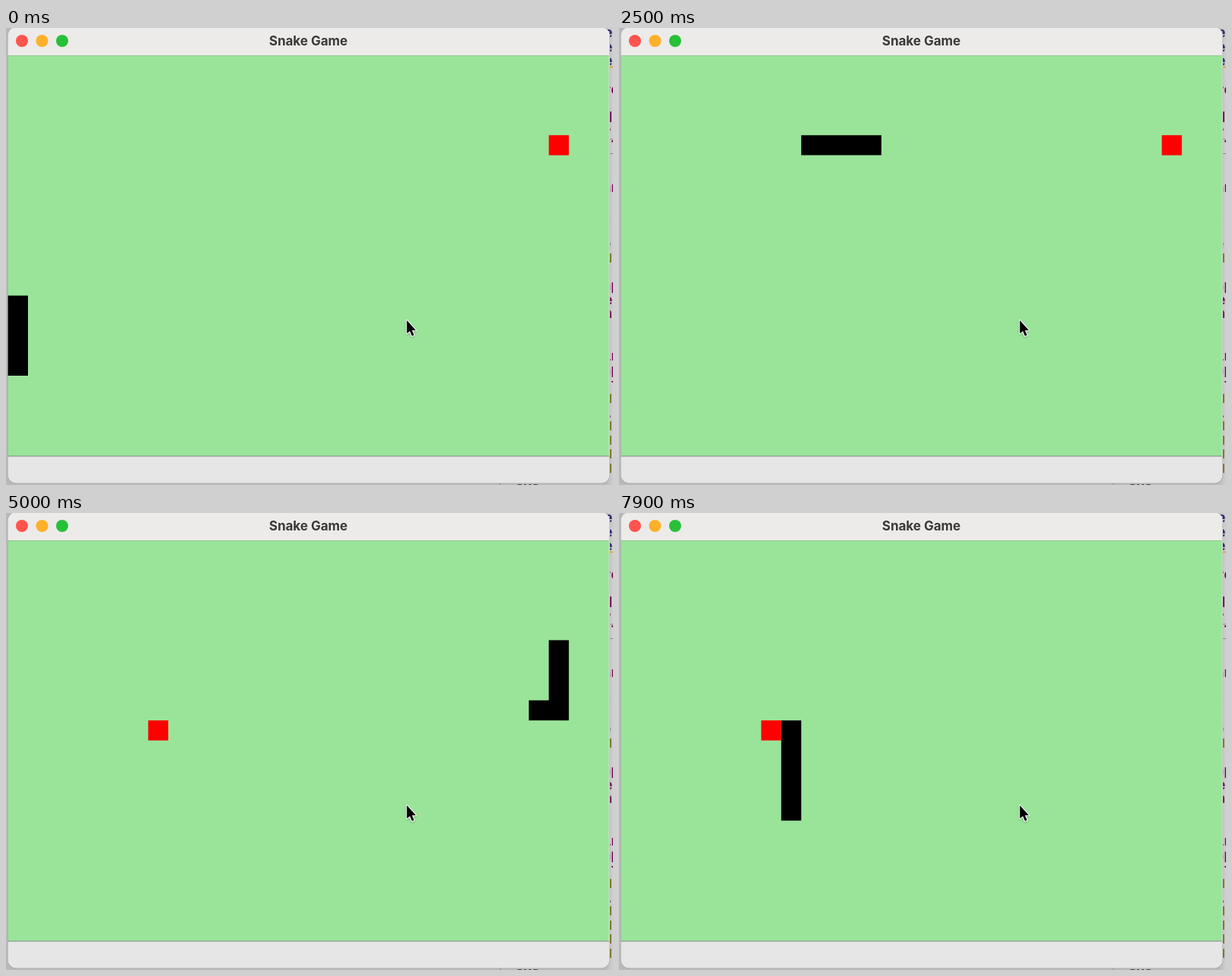
Animation of 800 by 602 pixels, one loop 8 s. Source, as an HTML page:

```html
<!DOCTYPE html>
<html lang="en">
<head>
<meta charset="utf-8">
<title>Snake Game</title>
<style>
  html, body { margin: 0; width: 100%; height: 100%; overflow: hidden; background: #c4c3c4; }
  svg { display: block; width: 800px; height: 602px; }
  .title { font: 700 17px Inter, sans-serif; fill: #3b3838; text-anchor: middle; }
  .code { font: 700 17px "DejaVu Sans Mono", monospace; }
</style>
</head>
<body>
<svg viewBox="0 0 800 602">
  <defs>
    <linearGradient id="edge">
      <stop offset="0" stop-color="#bab8ba"/>
      <stop offset="1" stop-color="#d0cdd0"/>
    </linearGradient>
    <clipPath id="frame"><rect x="2.5" y="-1" width="793" height="600.5" rx="11"/></clipPath>
    <filter id="soft" x="-50%" y="-50%" width="200%" height="200%">
      <feDropShadow dx="0" dy="1" stdDeviation="1" flood-opacity=".3"/>
    </filter>
  </defs>

  <!-- editor behind the window -->
  <rect width="800" height="602" fill="#b9b9b9"/>
  <rect x="790" width="10" height="602" fill="url(#edge)"/>
  <path d="M790 51.5h10" stroke="#e5a53a" stroke-width="2"/>
  <path d="M790 146.5h10M790 165.5h10M651.5 598v4" stroke="#8b898b"/>
  <g id="code" class="code"></g>
  <path id="bars" stroke="#77701a" stroke-width="2.5"/>
  <text class="code" x="672" y="611" fill="#333">ays</text>

  <!-- window -->
  <rect x="2" y="-1" width="794" height="601" rx="11.5" fill="#9a9a9a"/>
  <g clip-path="url(#frame)">
    <rect width="800" height="37" fill="#ecebe9"/>
    <rect x="2" y="36" width="794" height="528" fill="#9ae49a"/>
    <rect x="2" y="36" width="794" height="1" fill="#8dcb8b"/>
    <rect x="2" y="564" width="794" height="40" fill="#e6e6e6"/>
    <rect x="2" y="563.5" width="794" height="1" fill="#858985"/>
    <rect x="794.5" y="36" width="2" height="528" fill="#dcdedc"/>
  </g>
  <circle cx="21" cy="17" r="8" fill="#ff544d"/>
  <circle cx="47.5" cy="17" r="8" fill="#ffb02a"/>
  <circle cx="74" cy="17" r="8" fill="#28c038"/>
  <text class="title" x="398.5" y="22.5">Snake Game</text>

  <!-- one grid cell is one unit -->
  <g transform="translate(2.6 35.6) scale(26.4)">
    <rect id="food" width="1" height="1" fill="#f00"/>
    <polyline id="snake" fill="none" stroke="#000" stroke-linecap="square"/>
  </g>

  <path d="M528.3 385V402.6L532.3 399.2L535 405.8L537.8 404.6L535 398.2H540.2Z"
        stroke="#fff" stroke-width="2" stroke-linejoin="round" paint-order="stroke" filter="url(#soft)"/>
</svg>
<script>
  const LOOP = 8000, FRAME = 100, STEP = 125, PHASE = 87;
  const EATEN = 35;   // move on which the snake reaches the food
  const TAIL = 3;     // path cells already behind the head at the start

  const $ = id => document.getElementById(id);

  // Slivers of code visible past the window: [baseline, text, colour]
  const purple = '#7b1060', navy = '#26246e', teal = '#2c5a66';
  const lines = [
    [12, 'e', navy], [31, 'e', navy], [49, 'e', navy],
    [87, 'ro', purple], [124, 'd', purple], [139, '-', purple],
    [161, 'IT', purple], [216, 'an', purple], [253, '3.', teal],
    [290, "e'", teal], [345, 'ap', purple], [364, 'e', purple],
    [382, 'n', purple], [402, 'c:', purple], [419, 't:', purple],
    [438, 'in', purple], [456, 'ap', purple], [475, 'ct', purple], [517, '-', purple]
  ];
  $('code').innerHTML = lines
    .map(([y, s, c]) => `<text x="${s.length > 1 ? 787 : 789}" y="${y}" fill="${c}">${s}</text>`).join('');
  $('bars').setAttribute('d', [297, 482, 518, 537, 555, 574].map(y => `M796.5 ${y}v12`).join(''));

  // Head route: start cell, then [dx, dy, moves]
  const route = [[0, 15]];
  for (const [dx, dy, n] of [[0, -1, 11], [1, 0, 27], [0, 1, 4], [-1, 0, 19], [0, 1, 6]]) {
    for (let i = 0; i < n; i++) {
      const [x, y] = route[route.length - 1];
      route.push([x + dx, y + dy]);
    }
  }

  function draw(now) {
    const t = Math.floor((now % LOOP) / FRAME) * FRAME;
    const move = Math.floor((t + PHASE) / STEP);
    const fed = move >= EATEN;
    const head = move + TAIL, size = fed ? 5 : 4;
    const body = route.slice(head - size + 1, head + 1);
    $('snake').setAttribute('points', body.map(([x, y]) => `${x + .5},${y + .5}`).join(' '));
    const [x, y] = fed ? [7, 9] : [27, 4];
    $('food').setAttribute('x', x);
    $('food').setAttribute('y', y);
  }

  let start;
  function tick(now) {
    start ??= now;
    draw(now - start);
    requestAnimationFrame(tick);
  }
  draw(0);
  requestAnimationFrame(tick);
</script>
</body>
</html>
```
